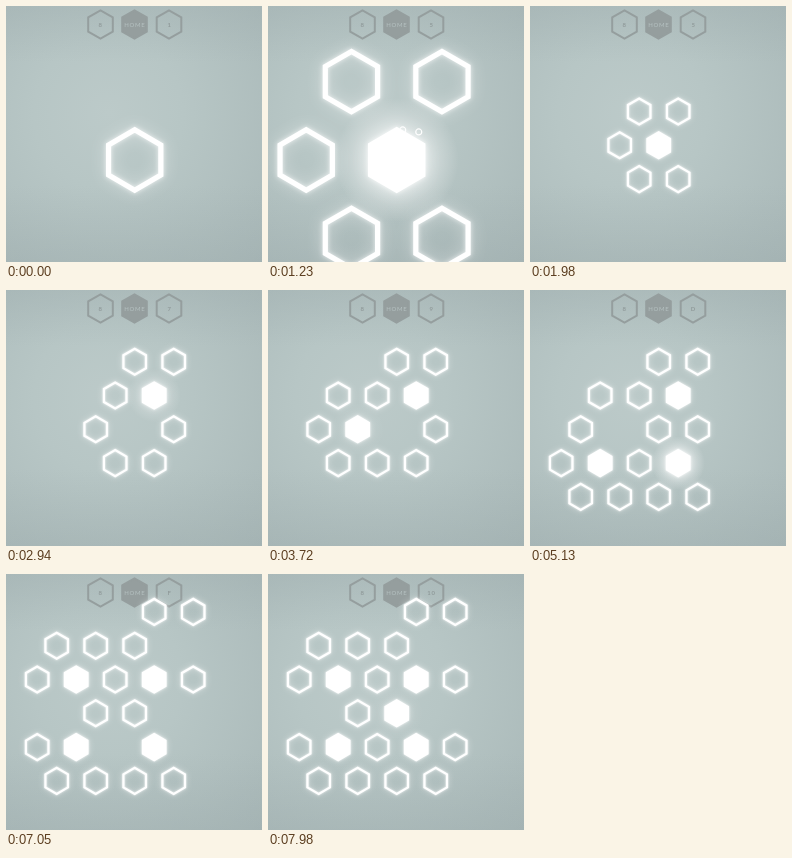
An HTML page that plays this animation: 256 by 256 pixels, repeating every 8000 ms.

```html
<!DOCTYPE html>
<html lang="en">
<head>
<meta charset="utf-8">
<title>Hex field</title>
<style>
  html, body { margin: 0; width: 100%; height: 100%; overflow: hidden; }
  body {
    background:
      linear-gradient(rgba(155,170,171,.32), rgba(155,170,171,0) 22%, rgba(155,170,171,0) 70%, rgba(150,165,166,.26)),
      radial-gradient(circle at 40% 42%, #bccac9 0, #b7c6c5 35%, #a9b8b8 100%);
  }
  svg { display: block; width: 256px; height: 256px; }
  .hud path { fill: none; stroke: #959e9e; stroke-width: 2; }
  .hud .home { fill: #959e9e; }
  .hud text {
    font: 700 6px Lato, "Open Sans", sans-serif;
    letter-spacing: .7px; text-anchor: middle; fill: #919b9b;
  }
  .hud .label { fill: #b6c2c2; font-weight: 400; }
  .cells {
    fill: none; stroke: #fff; stroke-width: 5.2;
    filter: drop-shadow(0 0 2.5px rgba(255,255,255,.75)) drop-shadow(0 0 8px rgba(255,255,255,.45));
  }
  .cells .filled { fill: #fff; }
  .cells .off { display: none; }
  #rings { fill: none; stroke: #fff; stroke-width: 1.2; }
</style>
</head>
<body>
<svg viewBox="0 0 256 256">
  <defs>
    <radialGradient id="glow">
      <stop offset=".35" stop-color="#fff" stop-opacity=".55"/>
      <stop offset="1" stop-color="#fff" stop-opacity="0"/>
    </radialGradient>
  </defs>
  <g class="hud" id="hud">
    <text x="94.5" y="20.8">8</text>
    <text x="163.5" y="20.8" id="count">1</text>
  </g>
  <g id="field">
    <circle id="flash" r="62" fill="url(#glow)"/>
    <g class="cells" id="cells"></g>
    <g id="rings"><circle r="3"/><circle r="3"/></g>
  </g>
</svg>
<script>
const LOOP = 8000, BURST = 180;
const STEP_X = 45.25, STEP_Y = 78.4, SMALL = .431;
const NS = "http://www.w3.org/2000/svg";
const $ = id => document.getElementById(id);

// Cells are "column,row" in half-hex columns around the first cell.
const EVENTS = [
  { at: 0, open: "0,0" },
  { at: 1230, fill: "0,0", open: "-1,-1 1,-1 -2,0 -1,1 1,1" },
  { at: 2850, fill: "1,-1", open: "0,-2 2,-2 2,0", gone: "0,0" },
  { at: 3570, fill: "-2,0", open: "-3,-1 -4,0 -3,1" },
  { at: 4440, fill: "-3,1", open: "-5,1 -4,2 -2,2", gone: "-2,0" },
  { at: 5130, fill: "1,1", open: "0,0 0,2 2,2" },
  { at: 5520, gone: "0,0" },
  { at: 6180, fill: "-3,-1", open: "-4,-2 -2,-2 -5,-1 -2,0" },
  { at: 6210, open: "0,0" },
  { at: 6810, gone: "-1,1" },
  { at: 6990, open: "1,-3 3,-3 3,-1", gone: "2,-2 -4,0 2,0" },
  { at: 7830, fill: "0,0", open: "-1,1 3,1" }
];

function hexPath(r, x = 0, y = 0) {
  const points = Array.from({ length: 6 }, (_, i) => {
    const a = (i + .5) * Math.PI / 3;
    return (x + r * Math.cos(a)).toFixed(2) + " " + (y + r * Math.sin(a)).toFixed(2);
  });
  return "M" + points.join("L") + "Z";
}

function addPath(parent, d, cls, before = null) {
  const path = document.createElementNS(NS, "path");
  path.setAttribute("d", d);
  path.setAttribute("class", cls);
  parent.insertBefore(path, before);
  return path;
}

const split = list => list ? list.split(" ") : [];
const place = key => {
  const [col, row] = key.split(",").map(Number);
  return [col * STEP_X, row * STEP_Y];
};

for (const x of [94.5, 128.5, 163]) {
  addPath($("hud"), hexPath(14.2, x, 18.5), x === 128.5 ? "home" : "", $("hud").firstChild);
}
const label = document.createElementNS(NS, "text");
label.setAttribute("x", 128.8);
label.setAttribute("y", 20.8);
label.setAttribute("class", "label");
label.textContent = "HOME";
$("hud").append(label);

const cells = {};
for (const event of EVENTS) {
  for (const key of split(event.open)) {
    cells[key] ??= addPath($("cells"), hexPath(30.2, ...place(key)), "off");
  }
}

function stateAt(t) {
  const state = {};
  let click = null;
  for (const event of EVENTS) {
    if (event.at > t) break;
    for (const kind of ["gone", "open", "fill"]) {
      for (const key of split(event[kind])) state[key] = kind;
    }
    if (event.fill) click = event;
  }
  return { state, click };
}

const CLASSES = { open: "", fill: "filled" };

function draw(t) {
  const { state, click } = stateAt(t);
  let open = 0;
  for (const key in cells) {
    cells[key].setAttribute("class", CLASSES[state[key]] ?? "off");
    if (state[key] === "open") open++;
  }
  $("count").textContent = open.toString(16).toUpperCase();

  // Zoom out once, shortly after the first click.
  const p = Math.min(1, Math.max(0, (t - 1800) / 180));
  const zoom = 1 - (1 - p) ** 2;
  const scale = 1 + (SMALL - 1) * zoom;
  $("field").setAttribute("transform", `translate(128.7 ${154 - 14.7 * zoom}) scale(${scale})`);

  const age = click ? (t - click.at) / BURST : 1;
  const fade = Math.max(0, 1 - age);
  const [x, y] = click ? place(click.fill) : [0, 0];
  $("flash").setAttribute("transform", `translate(${x} ${y})`);
  $("flash").setAttribute("opacity", fade);

  const first = click && click.at === 1230;
  $("rings").setAttribute("opacity", first ? fade : 0);
  [[22, -28], [6, -30]].forEach(([dx, dy], i) => {
    const spread = 1 + .35 * Math.min(1, age);
    $("rings").children[i].setAttribute("transform", `translate(${dx * spread} ${dy * spread})`);
  });
}

const start = performance.now();
function tick() {
  draw((performance.now() - start) % LOOP);
  requestAnimationFrame(tick);
}
tick();
</script>
</body>
</html>
```
